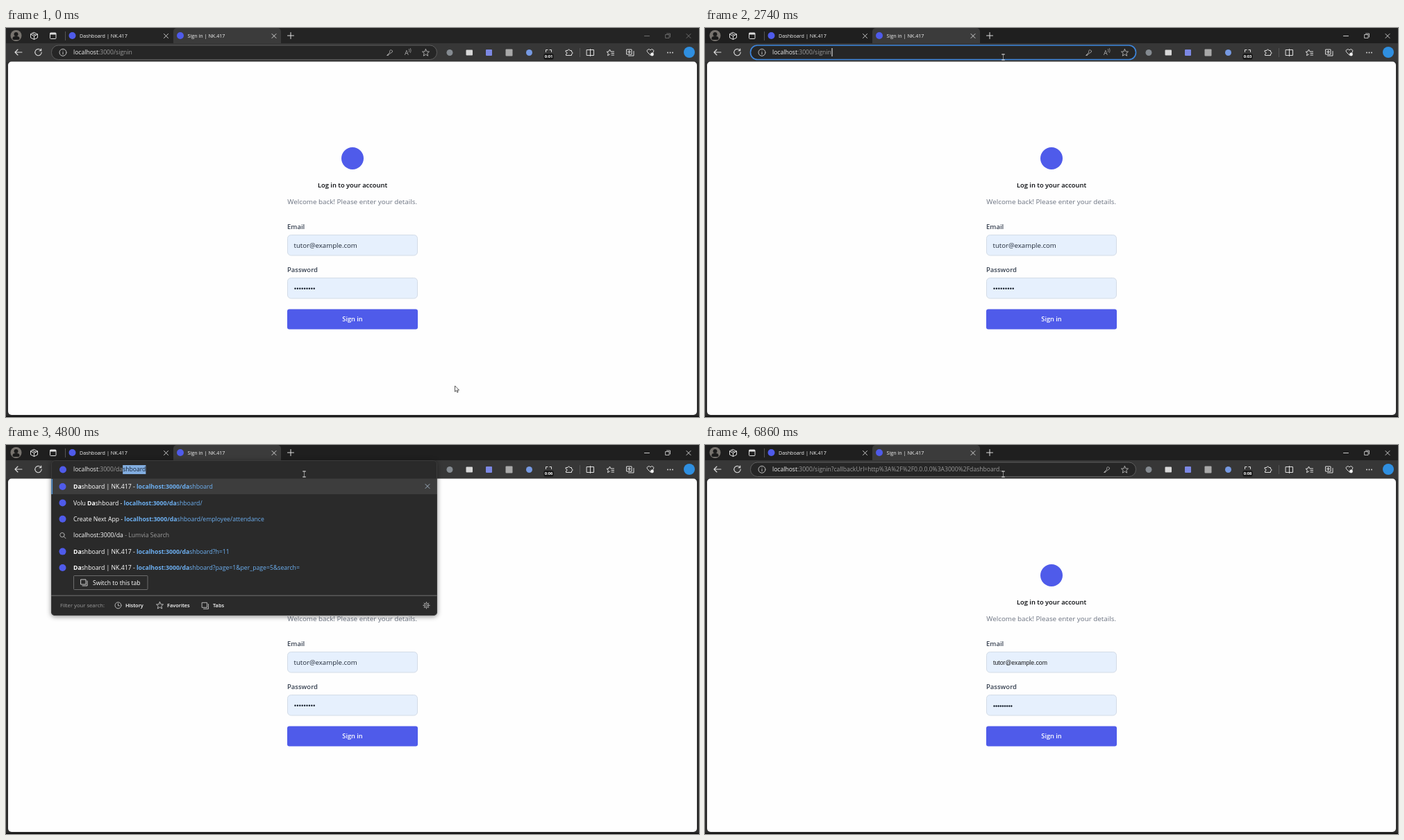
Animation of 998 by 561 pixels, one loop 6.88 s. Source, as an HTML page with a canvas:

```html
<!DOCTYPE html>
<html lang="en">
<head>
<meta charset="utf-8">
<title>Sign in</title>
<style>
  html, body { margin: 0; width: 100%; height: 100%; overflow: hidden; background: #2b2b2b; }
  canvas { display: block; }
</style>
</head>
<body>
<canvas id="stage" width="998" height="561"></canvas>
<script>
const ctx = document.getElementById('stage').getContext('2d');
const LOOP = 6880;
const BRAND = 'NK.417', HOST = 'localhost', BASE = 'localhost:3000/';
const BLUE = '#4f5bea', LINK = '#6db0f2', WHITE = '#fff', GREY = '#9b9b9b', ICON = '#dedede';
const SANS = '"Open Sans", "Noto Sans", sans-serif';

// Moments of the story, in ms
const T = { move: 510, arrive: 1120, click: 1210, caret: 2320, erase: 3210, opened: 3400,
            typeD: 4610, typeA: 4700, enter: 5270, loaded: 5980 };

const clamp = v => Math.max(0, Math.min(1, v));
const smooth = v => v * v * (3 - 2 * v);

// Draws text centred vertically on mid and returns its right edge
function text(str, x, mid, size, color, weight = 400, align = 'left', family = SANS) {
  ctx.font = `${weight} ${size}px ${family}`;
  ctx.textAlign = align;
  ctx.fillStyle = color;
  ctx.fillText(str, x, mid + size * 0.357);
  return x + ctx.measureText(str).width;
}

function box(x, y, w, h, r, fill, stroke, width = 1) {
  ctx.beginPath();
  ctx.roundRect(x, y, w, h, r);
  if (fill) { ctx.fillStyle = fill; ctx.fill(); }
  if (stroke) { ctx.strokeStyle = stroke; ctx.lineWidth = width; ctx.stroke(); }
}

function disc(x, y, r, fill) {
  ctx.beginPath();
  ctx.arc(x, y, r, 0, 7);
  ctx.fillStyle = fill;
  ctx.fill();
}

// Strokes an SVG path placed around a centre
function icon(path, x, y, color = ICON, width = 1) {
  ctx.save();
  ctx.translate(x, y);
  ctx.strokeStyle = color;
  ctx.lineWidth = width;
  ctx.lineCap = ctx.lineJoin = 'round';
  ctx.stroke(new Path2D(path));
  ctx.restore();
}

const RING = r => `M${r} 0A${r} ${r} 0 1 1 ${-r} 0A${r} ${r} 0 1 1 ${r} 0`;
const CROSS = 'M-3-3L3 3M3-3L-3 3';
const STAR = 'M0-5L1.5-1.6 5-1.4 2.3 1 3.2 4.7 0 2.7-3.2 4.7-2.3 1-5-1.4-1.5-1.6Z';
const BACK = 'M5 0H-5M-1-4L-5 0-1 4';
const RELOAD = 'M3.6-3A4.7 4.7 0 1 0 4.7 0M4.2-5V-2.2H1.4';
const INFO = RING(5) + 'M0-.5V2.5M0-2.6V-2.5';
const KEY = 'M4-2A2 2 0 1 0 .5-.5L-4 4H-2V2.6H-.6L1.7.3A2 2 0 0 0 4-2';
const CUBE = 'M0-5L5-2.5V2.5L0 5-5 2.5V-2.5ZM-5-2.5L0 0 5-2.5M0 0V5M-2.5-3.7L2.5-1.2';
const TABS = 'M-4-4H3V3H-4ZM-2 5H5V-2';
const PUZZLE = 'M-4-3H-1.5A1.5 1.5 0 0 1 1.5-3H4V-1A1.5 1.5 0 0 1 4 2V4H-4V2A1.5 1.5 0 0 0-4-1Z';
const HEART = 'M0 4L-4.5-.5A2.4 2.4 0 0 1 0-3 2.4 2.4 0 0 1 4.5-.5Z';
const CLOCK = RING(4.5) + 'M0-2.5V.5H2';
const GEAR = RING(1.6) + RING(3.4) + 'M0-4.8V-3.6M0 4.8V3.6M-4.8 0H-3.6M4.8 0H3.6M-3.4-3.4L-2.6-2.6M3.4 3.4L2.6 2.6M3.4-3.4L2.6-2.6M-3.4 3.4L-2.6 2.6';

function drawPage(t) {
  box(3, 48.5, 992, 509.5, 5, '#fefefe');
  disc(499, 188, 16, BLUE);
  text('Log in to your account', 499, 227, 9.35, '#05070b', 600, 'center');
  text('Welcome back! Please enter your details.', 405.3, 250.5, 9.83, '#6b7280');
  text('Email', 405, 287, 9.5, '#374151', 600);
  text('Password', 405, 349, 9.5, '#374151', 600);
  for (const y of [298.5, 360.5]) box(405.5, y, 187, 29.5, 5, '#e6f0fd', '#d3dce7');

  const autofilled = t >= T.loaded;
  if (autofilled) text('tutor@example.com', 415, 313.5, 8.7, '#151515', 400, 'left', '"Liberation Sans", Arial, sans-serif');
  else text('tutor@example.com', 414.5, 313.5, 9.65, '#1f2937');
  for (let i = 0; i < 9; i++) disc(416.5 + i * (autofilled ? 3.1 : 3.4), autofilled ? 376.5 : 375.7, 1.2, '#17202c');

  box(405, 405.5, 188, 29, 3, BLUE);
  text('Sign in', 499, 420.2, 9.2, '#fff', 600, 'center');
}

function drawTabs(t) {
  const active = t >= T.click, loading = t >= T.enter && t < T.loaded;
  ctx.fillStyle = active ? '#1f1f1f' : '#242424';
  ctx.fillRect(0, 0, 998, 23);
  box(241, 0, 155, 24, [5, 5, 0, 0], '#3b3b3b');

  disc(14.5, 11, 8, '#77736e');
  disc(14.5, 9, 3, '#1b1b1b');
  box(9.5, 12, 10, 5, [4, 4, 2, 2], '#1b1b1b');
  icon(CUBE, 40.5, 11.5);
  box(63.5, 7, 8.5, 8.5, 1, null, ICON);
  ctx.fillStyle = ICON;
  ctx.fillRect(63.5, 7, 8.5, 2.5);
  ctx.fillStyle = '#555';
  ctx.fillRect(85, 5, 1, 13);

  disc(95.5, 11, 5, BLUE);
  text('Dashboard | ' + BRAND, 106, 11, 7.2, '#f4f4f4');
  icon(CROSS, 230.5, 11.5, ICON, 0.9);
  if (loading) { disc(244, 8.5, 0.8, ICON); disc(244, 12, 0.8, ICON); }
  else disc(251, 11, 5, BLUE);
  text('Sign in | ' + BRAND, 261.5, 11, 7.2, '#f4f4f4');
  icon(CROSS, 386, 11.5, ICON, 0.9);
  icon('M-4.5 0H4.5M0-4.5V4.5', 410, 11);

  const controls = active ? ICON : '#777';
  icon('M-3.5 0H3.5', 923, 11.5, controls, 0.9);
  icon('M-3-2H2V3H-3ZM-1.5-3.5H3.5V1.5', 953, 11.5, controls, 0.8);
  icon(CROSS, 983, 11.5, controls, 0.9);
}

function drawExtensions(t) {
  const y = 35.5;
  disc(639, y, 4.5, '#858b91');
  box(662.5, y - 4, 9.5, 8, 1, '#d8d8d8');
  box(691, y - 4.5, 9, 9, 1, '#7c88e4');
  box(719.5, y - 5, 10, 10, 1, '#a9a9a9');
  disc(753.5, y, 4.5, '#7699e2');

  icon('M-4-1V-4H-1.5M1.5-4H4V-1', 781.5, y);
  box(774.5, 37, 14, 8.5, 2, '#171717');
  const seconds = 1 + Math.max(0, Math.floor((t + 220) / 1000));
  text('0:0' + seconds, 781.5, 41.3, 5.8, '#fff', 700, 'center');

  icon(PUZZLE, 810.5, y);
  ctx.fillStyle = '#555';
  ctx.fillRect(826, 29, 1, 13);
  icon('M-5-4H5V4H-5ZM0-5V5', 841.5, y);
  icon('M-1 2.5L-4 4.2-3.2.8-5.5-1.2-2.5-1.5-1-4.5.5-1.5H5M1.5 1H5M1.5 3.5H5', 870.5, y);
  icon('M-5-4.5H2V2.5H-5ZM-2.5 4.5H5V-2M-1.5-3V1M-3.5-1H.5', 899, y);
  icon(HEART, 928, y - 0.5);
  disc(930.5, 38, 2.4, '#eee');
  for (const dx of [-3.5, 0, 3.5]) disc(956.5 + dx, y, 0.9, ICON);
  disc(984, 35, 8, '#2f8fe0');
}

function drawToolbar(t) {
  ctx.fillStyle = '#373737';
  ctx.fillRect(0, 22, 998, 27);
  icon(BACK, 18, 35, ICON, 1.1);
  if (t >= T.enter && t < T.loaded) icon(CROSS, 46.5, 35, ICON, 1.2);
  else icon(RELOAD, 46.5, 35, ICON, 1.1);
  drawExtensions(t);
}

function address(path) {
  const x = text(HOST, 97, 35.2, 8.6, '#f0f0f0');
  return text(path, x, 35.2, 8.6, GREY);
}

function selected(str, x) {
  ctx.font = `400 8.6px ${SANS}`;
  ctx.fillStyle = '#83aee0';
  ctx.fillRect(x, 29, ctx.measureText(str).width, 13);
  text(str, x, 35.2, 8.6, '#182436');
}

function caret(x, t) {
  if (Math.floor((t - T.caret + 20) / 500) % 2 === 0) {
    ctx.fillStyle = '#f4f4f4';
    ctx.fillRect(Math.round(x) + 0.5, 29, 1, 12);
  }
}

function drawAddressBar(t) {
  const focused = t >= T.click && t < T.enter;
  box(65.5, 25, 555, 20.5, 10, '#262626', focused ? '#3d86dd' : '#626262', focused ? 1.6 : 0.9);
  icon(INFO, 82, 35.3, '#d0d0d0', 0.9);
  icon(STAR, 604.5, 35.5, '#b8b8b8', 0.9);
  if (t < T.enter) {
    icon(KEY, 552.5, 35.5, '#aaa', 0.9);
    text('A', 574, 35.5, 9, '#b0b0b0');
    icon('M0-2Q1 0 0 2M2-3Q3.5 0 2 3', 580.5, 32.5, '#b0b0b0', 0.7);
  } else if (t >= T.loaded) icon(KEY, 578.5, 35.5, '#aaa', 0.9);

  if (t < T.click) address(':3000/signin');
  else if (t < T.caret) selected(BASE + 'signin', 97);
  else if (t < T.enter) caret(address(':3000/signin'), t);
  else if (t < T.loaded) address(':3000/dashboard');
  else address(':3000/signin?callbackUrl=http%3A%2F%2F0.0.0.0%3A3000%2Fdashboard..');
}

// Each run is [text, color, weight]
function runs(list, mid) {
  let x = 97;
  for (const [str, color, weight] of list) x = text(str, x, mid, 8.7, color, weight);
}

const plain = str => [str, WHITE, 400];
const bold = str => [str, WHITE, 700];
const link = (path, typed) => path.startsWith(typed)
  ? [[BASE + typed, LINK, 700], [path.slice(typed.length), LINK, 400]]
  : [[BASE + path, LINK, 400]];

function suggestions(typed) {
  const dash = plain(' - ');
  const entry = (title, path) => [plain(title), dash, ...link(path, typed)];
  const signIn = 'Sign in | ' + BRAND;
  const search = [plain(BASE + typed), [' - Lumvia Search', GREY, 400]];
  const app = entry('Create Next App', 'dashboard/employee/attendance');
  if (!typed) return [
    [plain('Dashboard | ' + BRAND), dash, ['localhost:3000', LINK, 700]],
    entry(signIn, 'signin'),
    entry(signIn, 'dashboard'),
    search,
    entry(signIn, 'api/auth/signin'),
    app,
    [bold(BASE), plain('api/hash-password'), dash, ...link('api/hash-password', '')],
    entry(signIn, 'signin?callbackUrl=http%3A%2F%2Flocalhost%3A3000%2Fdashboard')
  ];
  const n = typed.length;
  const board = [bold('Dashboard'.slice(0, n)), plain('Dashboard'.slice(n))];
  const home = path => [...board, plain(` | ${BRAND} - `), ...link(path, typed)];
  return [
    home('dashboard'),
    [plain('Volu '), ...board, dash, ...link('dashboard/', typed)],
    app,
    search,
    home('dashboard?h=11'),
    home('dashboard?page=1&per_page=5&search=')
  ];
}

function drawPanel(t) {
  const typed = t < T.typeD ? '' : t < T.typeA ? 'd' : 'da';
  const bottom = typed ? 246 : 267;
  const fade = clamp((t - T.erase) / (T.opened - T.erase));

  ctx.save();
  ctx.globalAlpha = 1 - 0.4 * (1 - fade) ** 3;
  ctx.shadowColor = 'rgba(0,0,0,.45)';
  ctx.shadowBlur = 7;
  ctx.shadowOffsetY = 1.5;
  box(65, 22, 556, bottom - 22, 5, '#2a2a2a');
  ctx.restore();
  box(65.5, 22.5, 555, bottom - 23, 5, null, '#444', 0.7);
  ctx.fillStyle = 'rgba(255,255,255,.09)';
  ctx.fillRect(65, 48.5, 556, 22.5);
  ctx.fillStyle = '#5294d6';
  ctx.fillRect(65.5, 49, 1.6, 22);

  disc(82, 35.5, 5, BLUE);
  const end = address(':3000/' + typed);
  if (typed) selected('dashboard'.slice(typed.length), end);
  else caret(end, t);

  suggestions(typed).forEach((row, i) => {
    const y = 60 + i * 23.4;
    if (i === 3) icon(RING(3.2) + 'M2.3 2.3L5 5', 81, y - 0.5, '#aaa');
    else disc(81.5, y, 5, i === 6 ? '#5d9fc0' : BLUE);
    runs(row, y);
  });
  icon(CROSS, 607, 59.5, '#a9bccd', 0.9);

  if (typed) {
    box(97.5, 188.5, 106.5, 20, 1, null, '#747474', 0.9);
    icon(TABS, 112, 198, ICON, 0.9);
    text('Switch to this tab', 125, 198.5, 8.6, WHITE);
  }

  const foot = bottom - 14.7;
  ctx.fillStyle = '#5a5a5a';
  ctx.fillRect(65, bottom - 29.5, 556, 1.5);
  text('Filter your search:', 78, foot, 7.7, GREY);
  icon(CLOCK, 161.5, foot, '#c8c8c8', 0.9);
  text('History', 172, foot, 7.4, WHITE, 600);
  icon(STAR, 221.5, foot, '#c8c8c8', 0.9);
  text('Favorites', 232, foot, 7.4, WHITE, 600);
  icon(TABS, 286.5, foot, '#c8c8c8', 0.9);
  text('Tabs', 298, foot, 7.4, WHITE, 600);
  icon(GEAR, 605.5, foot, '#b8b8b8', 0.8);
}

function drawPointer(t) {
  const p = smooth(clamp((t - T.move) / (T.arrive - T.move)));
  const x = 646.5 - 217 * p, y = 516 - 474 * p;
  if (y < 46) {
    icon('M0-3V3', x, y, '#999', 0.9);
    icon('M-1.8-4H1.8M-1.8 4H1.8', x, y, '#fff', 1);
    return;
  }
  const arrow = new Path2D('M0 0V8.5L2 6.7 3.3 9.6 4.7 9 3.4 6.2H6Z');
  ctx.save();
  ctx.translate(x, y);
  ctx.fillStyle = '#fff';
  ctx.fill(arrow);
  ctx.strokeStyle = '#333';
  ctx.lineWidth = 0.8;
  ctx.stroke(arrow);
  ctx.restore();
}

function draw(t) {
  ctx.fillStyle = '#2d2d2d';
  ctx.fillRect(0, 0, 998, 561);
  ctx.fillStyle = '#111';
  ctx.fillRect(0, 559.5, 998, 1.5);
  drawTabs(t);
  drawToolbar(t);
  drawPage(t);
  if (t >= T.erase && t < T.enter) drawPanel(t);
  else drawAddressBar(t);
  drawPointer(t);
}

const start = performance.now();
function tick() {
  draw((performance.now() - start) % LOOP);
  requestAnimationFrame(tick);
}
tick();
</script>
</body>
</html>
```
